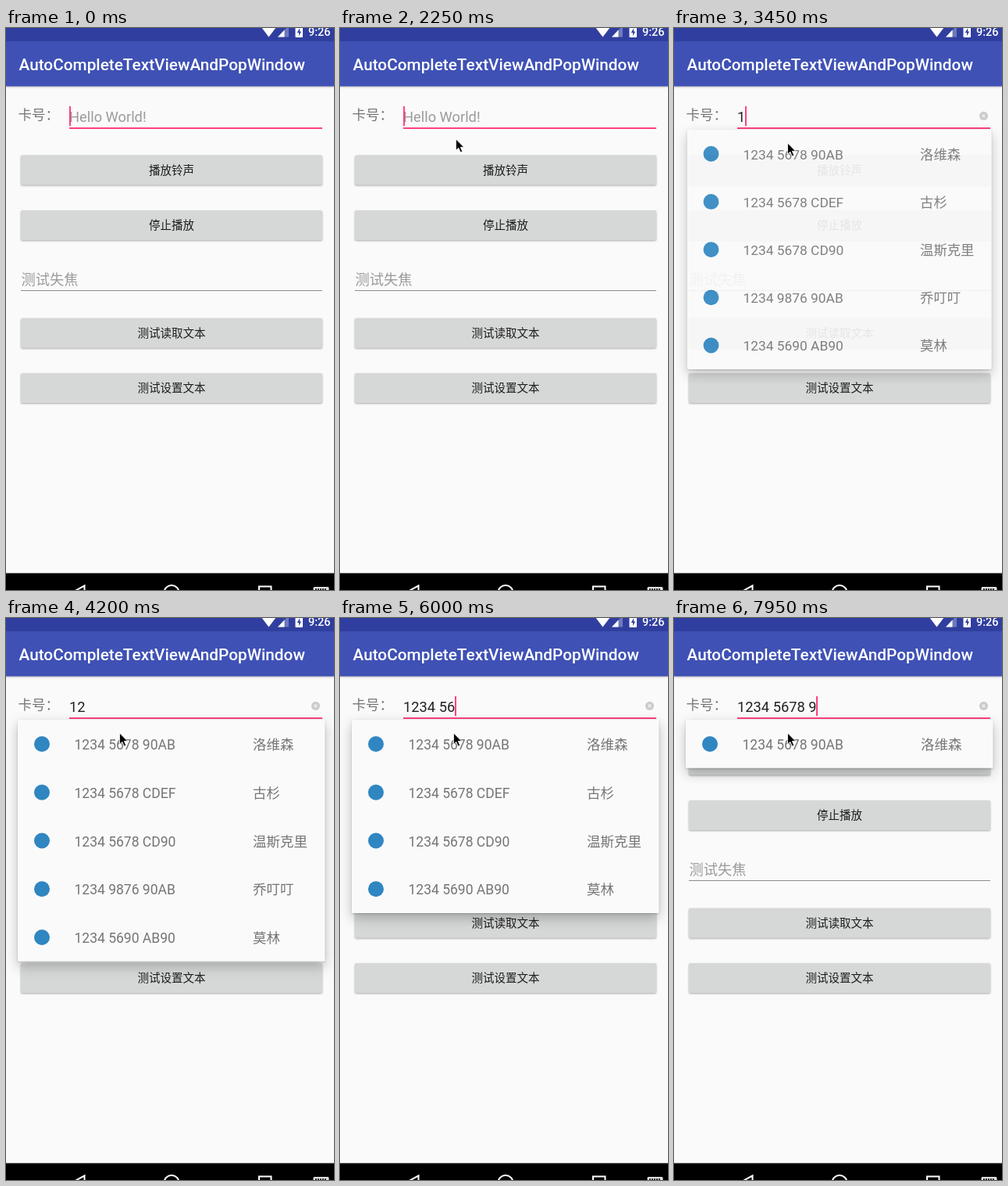
Animation, 420 px wide and 718 px high, one loop 8000 ms. Source, as an HTML page:

```html
<!DOCTYPE html>
<html lang="zh-CN">
<head>
<meta charset="utf-8">
<title>AutoCompleteTextViewAndPopWindow</title>
<style>
html, body { margin: 0; width: 100%; height: 100%; overflow: hidden; background: #fafafa; }
svg { display: block; font-family: Roboto, "Noto Sans CJK SC", "Noto Sans CJK", sans-serif; }
text { white-space: pre; }
.field { font-size: 18.3px; fill: #212121; }
.hint { fill: #9b9b9b; }
.row { font-size: 17.5px; fill: #757575; }
.button rect { fill: #d6d7d7; filter: drop-shadow(0 1px 1px rgba(0, 0, 0, .32)); }
.button text { font-size: 14.5px; fill: #1c1c1c; text-anchor: middle; }
.bar { filter: drop-shadow(0 1px 1px rgba(0, 0, 0, .25)); }
.panel { fill: #fafafa; filter: drop-shadow(0 1px 1px rgba(0, 0, 0, .18)) drop-shadow(0 6px 8px rgba(0, 0, 0, .24)); }
.nav { fill: none; stroke: #fff; stroke-width: 2; }
</style>
</head>
<body>
<svg width="420" height="718" viewBox="0 0 420 718">
  <rect width="420" height="718" fill="#fafafa"/>

  <rect class="bar" y="17" width="420" height="57.500" fill="#3f51b5"/>
  <rect width="420" height="17" fill="#303f9f"/>
  <text x="16.500" y="54" font-size="20.780" font-weight="500" fill="#fff">AutoCompleteTextViewAndPopWindow</text>

  <g fill="#fff">
    <path d="M327 -1H346L336.500 11.500Z"/>
    <path d="M348 11.500H362V-3Z" opacity=".3"/>
    <path d="M348 11.500H356.500V2.500Z"/>
    <rect x="370.500" y="-2" width="9.500" height="14" rx="1"/>
    <path d="M376.200 0L372.800 6H375V10L378.200 4.600H376.200Z" fill="#303f9f"/>
    <text x="387" y="10.300" font-size="14.500" font-weight="500">9:26</text>
  </g>

  <text class="row" x="15.500" y="117">卡号：</text>
  <text id="hint" class="field hint" x="81" y="120">Hello World!</text>
  <text id="typed" class="field" x="81" y="120"></text>
  <rect x="81" y="127" width="324" height="2" fill="#ff4081"/>
  <rect id="caret" y="100" width="2" height="25" fill="#ff4081"/>
  <g id="clear">
    <circle cx="396.500" cy="112.300" r="5.500" fill="#cbcbcb"/>
    <path d="M394.700 110.500L398.300 114.100M398.300 110.500L394.700 114.100" stroke="#f4f4f4" stroke-width="1.200"/>
  </g>

  <g id="buttons"></g>
  <text class="field hint" x="19.500" y="327.500">测试失焦</text>
  <rect x="19" y="335" width="386" height="1" fill="#8c8c8c"/>

  <rect y="696.500" width="420" height="22" fill="#000"/>
  <path class="nav" d="M100.500 728V712.500L84 721.500"/>
  <circle class="nav" cx="212" cy="721.500" r="9.500"/>
  <rect class="nav" x="324" y="713.500" width="15.500" height="16"/>
  <rect x="393.500" y="714" width="20" height="8" rx="1.500" fill="#ddd"/>
  <path d="M396 717.200H411" stroke="#000" stroke-width="1.800" stroke-dasharray="1.800 1.200"/>

  <g id="popup">
    <rect id="panel" class="panel" x="15" y="130" width="393.500" rx="1.500"/>
    <g id="rows"></g>
  </g>

  <path id="pointer" d="M-.5 0V14.200L2.800 11.200L5.300 16.800L7.700 15.700L5.300 10.300H9.700Z" fill="#000" stroke="#fff" stroke-width=".8"/>
</svg>
<script>
const LOOP = 8000, BLINK = 450, ROW = 61.75, POPUP_AT = 3450;
const $ = id => document.getElementById(id);

const cards = [
  ['1234 5678 90AB', '洛维森'],
  ['1234 5678 CDEF', '古杉'],
  ['1234 5678 CD90', '温斯克里'],
  ['1234 9876 90AB', '乔叮叮'],
  ['1234 5690 AB90', '莫林']
];
const keyTimes = [3300, 3750, 4500, 4950, 5550, 6000, 6450, 7500, 7950];

// time, x, y
const pointerStops = [
  [300, 402, 228], [450, 386, 240], [600, 372, 243],
  [900, 336, 224], [1050, 276, 184], [1200, 214, 146], [1350, 176, 119], [1500, 164, 113],
  [1950, 161, 119], [2100, 155, 131], [2250, 149, 142], [2400, 146, 147]
];

$('buttons').innerHTML = [
  [162.5, '播放铃声'], [233, '停止播放'], [370.8, '测试读取文本'], [441, '测试设置文本']
].map(([y, label]) => `<g class="button"><rect x="19" y="${y}" width="386" height="38" rx="2"/>
  <text x="212" y="${Math.round(y + 24.3)}">${label}</text></g>`).join('');

$('rows').innerHTML = cards.map(([number, name]) => `<g class="row">
  <circle cx="46" cy="161" r="10" fill="#2f86c1"/>
  <text x="87.5" y="168">${number}</text><text x="316" y="168">${name}</text></g>`).join('');
const rows = [...$('rows').children];

const show = (el, on) => el.setAttribute('visibility', on ? 'visible' : 'hidden');

function drawPopup(t, text) {
  let count = 0;
  cards.forEach(([number], i) => {
    const match = number.startsWith(text);
    rows[i].style.display = match ? '' : 'none';
    if (match) rows[i].setAttribute('transform', `translate(0 ${ROW * count++})`);
  });
  const opening = t < POPUP_AT + 150;
  $('panel').setAttribute('height', ROW * count);
  $('popup').style.display = t < POPUP_AT ? 'none' : '';
  $('popup').setAttribute('opacity', opening ? .91 : 1);
  $('popup').setAttribute('transform', opening ? 'translate(212 130) scale(.991) translate(-212 -130)' : '');
}

function draw(t) {
  const pressed = keyTimes.filter(k => k <= t);
  const text = '123456789'.slice(0, pressed.length).replace(/(\d{4})(?=\d)/g, '$1 ');
  const blinkStart = pressed.length ? pressed[pressed.length - 1] : 150;

  $('typed').textContent = text;
  show($('hint'), !text);
  show($('clear'), text);
  const width = text ? $('typed').getComputedTextLength() - .3 : 0;
  $('caret').setAttribute('x', Math.round(81 + width));
  show($('caret'), Math.floor(Math.max(0, t - blinkStart) / BLINK) % 2 === 0);

  drawPopup(t, text);

  const stop = pointerStops.filter(s => s[0] <= t).pop();
  show($('pointer'), stop);
  if (stop) $('pointer').setAttribute('transform', `translate(${stop[1]} ${stop[2]})`);
}

const start = performance.now();
function tick(now) {
  draw(Math.max(0, now - start) % LOOP);
  requestAnimationFrame(tick);
}
draw(0);
requestAnimationFrame(tick);
</script>
</body>
</html>
```
